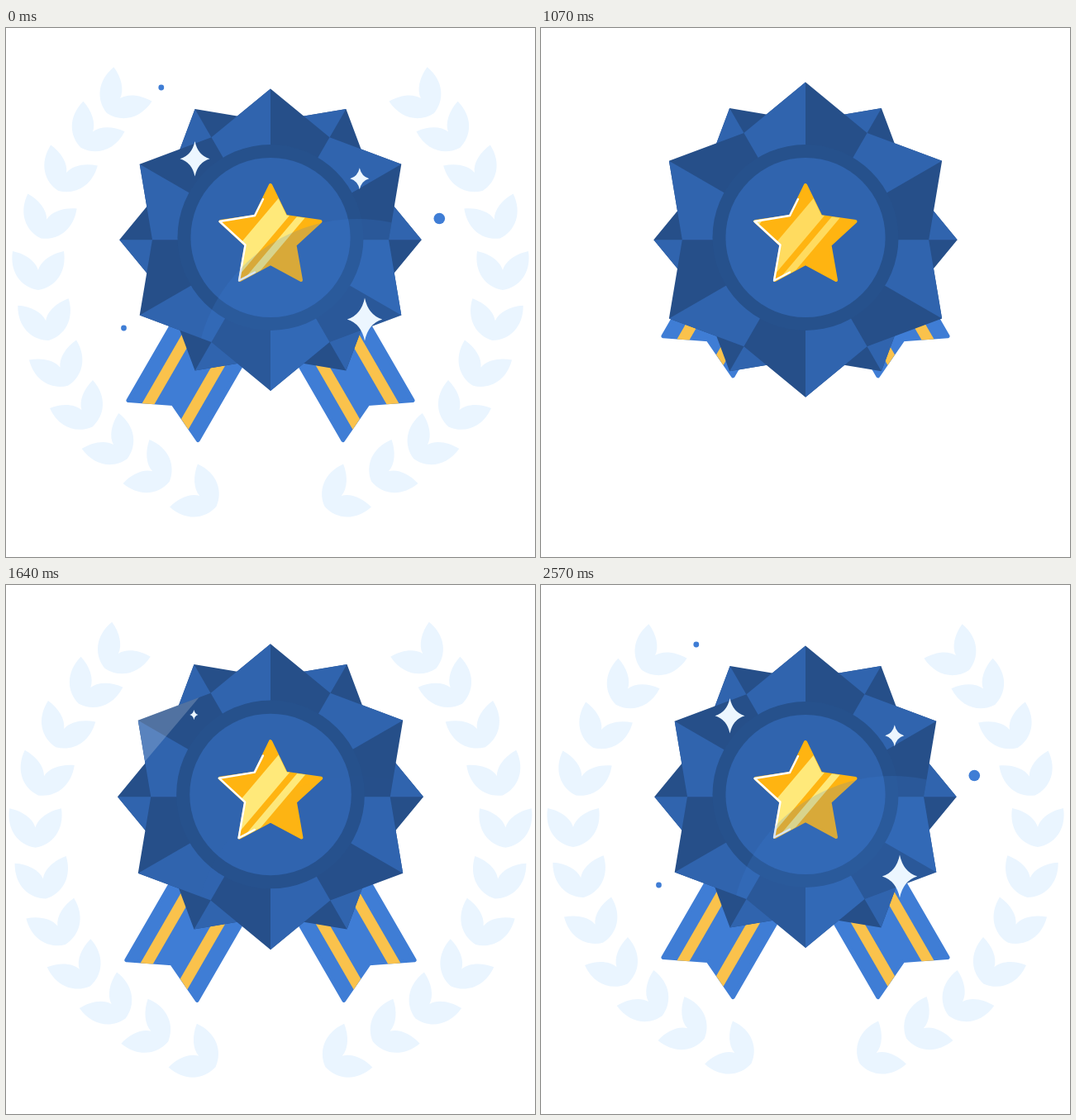
Write an HTML page with a canvas that moves like this. It is 640x640 px and loops after 6000 ms.

```html
<!DOCTYPE html>
<html lang="en">
<head>
<meta charset="utf-8">
<title>Award rosette</title>
<style>
  html, body { margin: 0; width: 100%; height: 100%; overflow: hidden; background: #fff; }
  canvas { display: block; width: 640px; height: 640px; }
</style>
</head>
<body>
<canvas id="stage" width="640" height="640"></canvas>
<script>
const ctx = document.getElementById('stage').getContext('2d');
const CX = 320, CY = 256.2, LOOP = 6000, FPS = 14, FIRST = 6, LAST = 36;
const DARK = '#264f89', LIGHT = '#3064ae', RING = '#26518c';
const BLUE = '#3f7dd5', GOLD = '#ffb411', PALE = '#ffe97a', STRIPE = '#fac24c';
const LEAF = '#eaf5ff', SPARK = '#ecf6ff';

// x, y and tilt in degrees of each leaf pair, from the bottom up
const LEAVES = [
  [215, 553.5, -57], [157.5, 524.5, -59], [114, 487.5, -44], [79, 443, -33],
  [56.5, 389.5, -23], [45, 331.5, -8], [39, 270, 0], [56, 209.5, 17],
  [82.5, 154, 24], [118.5, 107, 36], [153.5, 68, 42]
];
const leafPath = new Path2D('M-31 0C-35 26-20 44 0 47C20 44 35 26 31 0C16 3 3 12 0 23C-3 12-16 3-31 0Z');
const starPath = new Path2D('M320 190L338.5 228L380.5 234L349.5 262.5L357 305L320 285L283 305L290.5 262.5L259.5 234L301.5 228Z');
const starEdge = new Path2D('M311 207L301 227L258.5 234L289.5 262.5L282 305.5L301 295.5');
const sparkPath = new Path2D('M0-1Q.2-.2 1 0Q.2.2 0 1Q-.2.2-1 0Q-.2-.2 0-1Z');

const SPARKS = [[228.5, 158.3, 18, 21.3, 16], [427.8, 182.3, 11.5, 13, 19.2], [434, 352.5, 21.3, 26, 22.5]];
const DOTS = [[524.3, 230.5, 6.8, 20.1], [187.8, 72, 3.4, 23.5], [142.5, 363, 3.4, 24]];

// Value at u on a track of [time, value] keys, eased between keys
function track(u, ...keys) {
  if (u <= keys[0][0]) return keys[0][1];
  for (let i = 1; i < keys.length; i++) {
    const [t0, a] = keys[i - 1], [t1, b] = keys[i];
    if (u < t1) return a + (b - a) * (1 - Math.cos(Math.PI * (u - t0) / (t1 - t0))) / 2;
  }
  return keys[keys.length - 1][1];
}
const pop = (u, start) => track(u, [start, 0], [start + 3, 1.12], [start + 6, 1]);

function group(draw) {
  ctx.save();
  draw();
  ctx.restore();
}
function zoom(s, draw) {
  group(() => {
    ctx.translate(CX, CY);
    ctx.scale(s, s);
    ctx.translate(-CX, -CY);
    draw();
  });
}
function poly(points, color) {
  ctx.beginPath();
  points.forEach(p => ctx.lineTo(...p));
  ctx.closePath();
  ctx.fillStyle = color;
  ctx.fill();
}
function disc(x, y, r, color) {
  ctx.beginPath();
  ctx.arc(x, y, r, 0, 2 * Math.PI);
  ctx.fillStyle = color;
  ctx.fill();
}
function bothSides(draw) {
  draw();
  group(() => {
    ctx.translate(640, 0);
    ctx.scale(-1, 1);
    draw();
  });
}

// Corner i of a six-pointed burst; even corners are tips when odd = 0
function corner(i, odd) {
  const a = (i * 30 - 90) * Math.PI / 180, r = (i + odd) % 2 ? 143 : 182.8;
  return [CX + r * Math.cos(a), CY + r * Math.sin(a)];
}
function outline(odd) {
  return Array.from({ length: 12 }, (_, i) => corner(i, odd));
}
function burst(odd) {
  poly(outline(odd), DARK);
  for (let i = 0; i < 12; i++) {
    if ((i + odd) % 2) poly([corner(i, odd), corner(i + 1, odd), [CX, CY]], LIGHT);
  }
}

// Slanted band between two x positions measured at y = 253
function band(x0, x1, color) {
  const k = 0.845, d = 250;
  poly([[x0 + k * d, 253 - d], [x1 + k * d, 253 - d], [x1 - k * d, 253 + d], [x0 - k * d, 253 + d]], color);
}

function laurels(u) {
  const count = Math.max(0, Math.min(11, 2 * (u - 10)));
  ctx.fillStyle = LEAF;
  for (const [x, y, tilt] of LEAVES.slice(0, count)) {
    group(() => {
      ctx.translate(x, y);
      ctx.rotate(tilt * Math.PI / 180);
      ctx.fill(leafPath);
    });
  }
}

function ribbon() {
  const strip = (pts, color) => {
    const [p, q] = [pts[0], pts[pts.length - 1]];
    poly([...pts, [q[0] + 100, q[1] - 173], [p[0] + 100, p[1] - 173]], color);
  };
  strip([[148, 450.5], [202, 454.5], [232.3, 498.5]], BLUE);
  ctx.strokeStyle = BLUE;
  ctx.lineWidth = 5;
  ctx.lineJoin = 'round';
  ctx.stroke();
  strip([[164.5, 454.2], [179.5, 455.3]], STRIPE);
  strip([[212, 473], [220.5, 485.8]], STRIPE);
}

function shine(shift, alpha) {
  ctx.globalAlpha = alpha;
  band(290 + shift, 321 + shift, PALE);
  band(331 + shift, 342 + shift, PALE);
}

function medal(u) {
  disc(CX, 253.5, 112.5, RING);
  disc(CX, 253.5, 96.6, LIGHT);
  ctx.lineJoin = ctx.lineCap = 'round';
  ctx.fillStyle = ctx.strokeStyle = GOLD;
  ctx.lineWidth = 4;
  ctx.fill(starPath);
  ctx.stroke(starPath);
  group(() => {
    const clip = new Path2D();
    clip.addPath(starPath, new DOMMatrix([1.055, 0, 0, 1.055, -0.055 * CX, -0.055 * 254]));
    ctx.clip(clip);
    if (u < 12) shine(0, Math.min(1, (12 - u) / 4));
    if (u > 8) shine(Math.min(0, (u - 15.5) * 14), 1);
  });
  ctx.strokeStyle = '#fff';
  ctx.lineWidth = 2.4;
  ctx.stroke(starEdge);
}

function gloss(u) {
  ctx.beginPath();
  outline(0).forEach(p => ctx.lineTo(...p));
  ctx.clip();
  ctx.globalAlpha = track(u, [16, 0], [23.5, 0.2]);
  disc(425, 427, 196, BLUE);
  const p = (u - 16.3) / 11;
  if (p > 0 && p < 1) {
    const x = 50 + 550 * Math.sin(p * Math.PI / 2);
    ctx.globalAlpha = 0.2;
    band(x - 32, x + 32, '#fff');
  }
}

function scene(u) {
  const beat = Math.abs(u - 15.75) / 2.9;
  const pulse = beat < 1 ? 0.02 * Math.cos(beat * Math.PI / 2) ** 2 : 0;
  const back = track(u, [1.5, 0], [10, 1.04], [13, 1]);
  const front = track(u, [1.5, 0], [9, 1.043], [12, 1]);
  const core = track(u, [0, 0.015], [7.5, 1.03], [9, 1]);
  const drop = track(u, [6.5, -130], [12.5, 11], [18, 0]);

  ctx.clearRect(0, 0, 640, 640);
  zoom(1 + pulse, () => {
    bothSides(() => laurels(u));
    zoom(Math.min(1, back), () => {
      ctx.translate(0, drop);
      bothSides(ribbon);
    });
    zoom(back, () => burst(1));
    zoom(front, () => burst(0));
    zoom(core, () => medal(u));
    group(() => gloss(u));
    for (const [x, y, rx, ry, start] of SPARKS) {
      const s = pop(u, start);
      if (s) group(() => {
        ctx.translate(x, y);
        ctx.scale(rx * s, ry * s);
        ctx.fillStyle = SPARK;
        ctx.fill(sparkPath);
      });
    }
    for (const [x, y, r, start] of DOTS) disc(x, y, r * pop(u, start), BLUE);
  });
}

function frame() {
  const t = performance.now() % LOOP;
  const step = Math.floor(t * FPS / 1000 + 0.1);   // the motion runs at 14 poses a second
  scene((step < FIRST ? LAST : Math.min(step, LAST)) - FIRST);
  requestAnimationFrame(frame);
}
frame();
</script>
</body>
</html>
```
